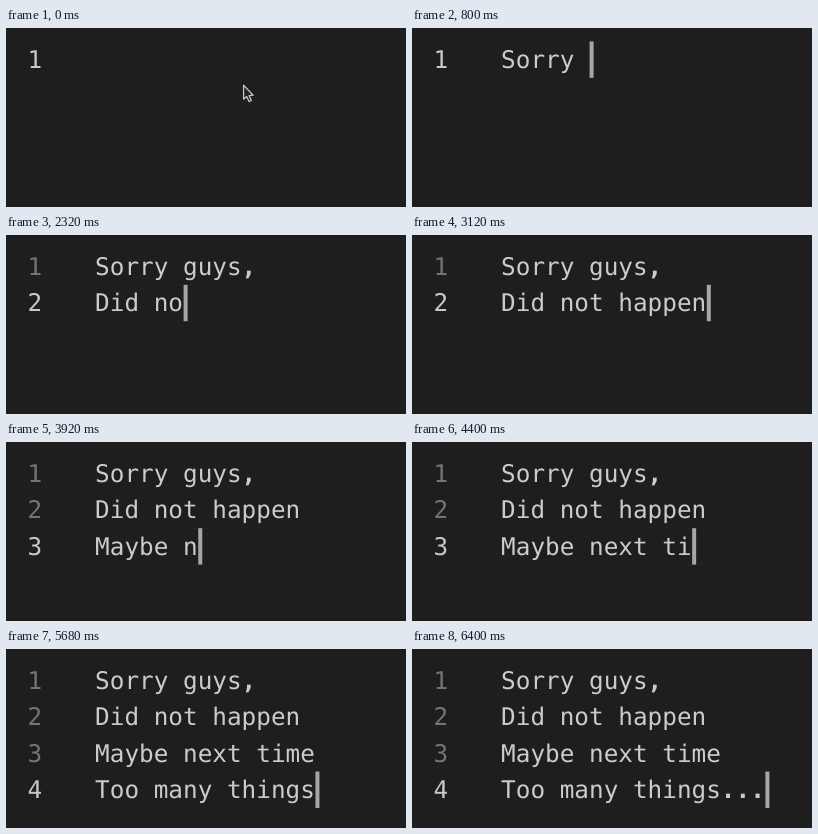
An HTML page with a canvas that plays this animation: 400x179 px, repeating every 6.64 s.

```html
<!DOCTYPE html>
<html lang="en">
<head>
<meta charset="utf-8">
<title>Typing in an editor</title>
<style>
  html, body { margin: 0; width: 100%; height: 100%; overflow: hidden; background: #1e1e1e; }
  canvas { display: block; width: 400px; height: 179px; }
</style>
</head>
<body>
<canvas id="stage"></canvas>
<script>
const W = 400, H = 179, LOOP = 6640, STEP = 80;
const COL = 14.65, ROW = 36.4, LEFT = 89.1, TOP = 13.4, BASE = 40, GUTTER = 21.6;
const FONT = '24.33px "DejaVu Sans Mono", "Liberation Mono", monospace';

// Bursts of typing: start time, then the keys added at each step.
const bursts = [
  [80, 'S'], [320, 'o'], [560, 'r|ry'], [800, ' '],
  [1200, 'g|u|ys'], [1520, ','], [1680, '\n'],
  [1920, 'D'], [2080, 'i|d| |no|t| |h|ap'], [2800, 'p'], [2960, 'e||n'], [3280, '\n'],
  [3440, 'Ma|yb|e '], [3920, 'n|e|x|t| '], [4400, 'ti|me|\n'],
  [4800, 'T|o|o| |ma|n|y| t|hi'], [5520, 'n|g|s|.|.|.']
];
const keys = bursts.flatMap(([start, text]) =>
  text.split('|').map((s, i) => ({ at: start + i * STEP, s })));

const caretOff = [[0, 80], [1040, 1200], [6160, 6400]];

const canvas = document.getElementById('stage');
const ctx = canvas.getContext('2d');
const scale = window.devicePixelRatio || 1;
canvas.width = Math.round(W * scale);
canvas.height = Math.round(H * scale);

function drawText(text, x, row, color) {
  ctx.fillStyle = color;
  [...text].forEach((c, i) => {
    ctx.font = (c === '.' || c === ',' ? 'bold ' : '') + FONT;
    ctx.fillText(c, x + i * COL, BASE + row * ROW);
  });
}

function drawPointer() {
  ctx.beginPath();
  ctx.moveTo(237.6, 57.2);
  ctx.lineTo(237.6, 71.2);
  ctx.lineTo(240.7, 68.6);
  ctx.lineTo(243, 73.6);
  ctx.lineTo(245.4, 72.5);
  ctx.lineTo(243.1, 67.6);
  ctx.lineTo(247.2, 67.2);
  ctx.closePath();
  ctx.fillStyle = '#202020';
  ctx.fill();
  ctx.strokeStyle = '#c4c4c4';
  ctx.lineWidth = 1.3;
  ctx.lineJoin = 'round';
  ctx.stroke();
}

function draw(t) {
  const lines = keys.filter(k => k.at <= t).map(k => k.s).join('').split('\n');
  const row = lines.length - 1;
  const y = TOP + row * ROW;

  ctx.setTransform(scale, 0, 0, scale, 0, 0);
  ctx.textRendering = 'geometricPrecision';
  ctx.fillStyle = '#1e1e1e';
  ctx.fillRect(0, 0, W, H);
  ctx.fillStyle = '#201d1f';
  ctx.fillRect(0, 174, W, 5);

  ctx.strokeStyle = '#212121';
  ctx.lineWidth = 1.5;
  ctx.strokeRect(89.5, y, W, ROW);

  lines.forEach((line, i) => {
    drawText(String(i + 1), GUTTER, i, i === row ? '#c8c8c8' : '#747474');
    drawText(line, LEFT, i, '#cbcbcb');
  });

  if (!caretOff.some(([a, b]) => t >= a && t < b)) {
    ctx.fillStyle = '#a6a6a6';
    ctx.fillRect(LEFT + lines[row].length * COL + 0.6, y, 4, ROW);
  }
  if (t < 80) drawPointer();
}

const begin = performance.now();
function tick() {
  draw((performance.now() - begin) % LOOP);
  requestAnimationFrame(tick);
}
tick();
</script>
</body>
</html>
```
